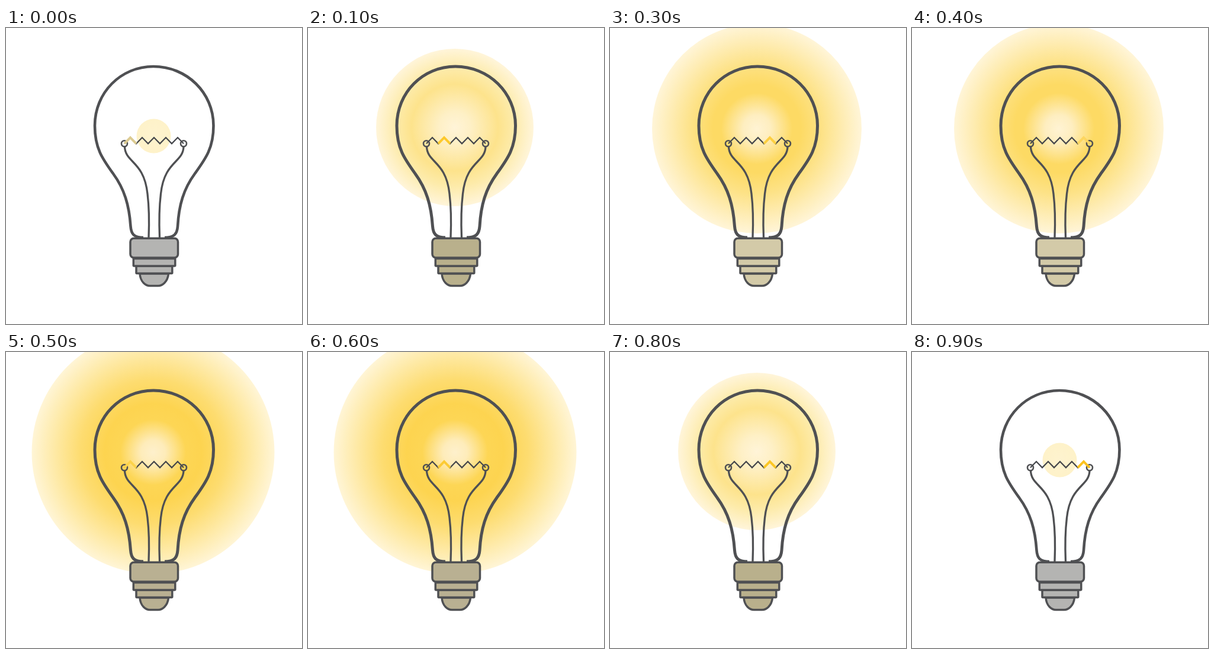
Write an HTML page with a canvas that moves like this. It is 500x500 px and loops after 1 s.

```html
<!DOCTYPE html>
<html lang="en">
<head>
<meta charset="utf-8">
<title>Light bulb</title>
<style>
html, body { margin: 0; width: 100%; height: 100%; overflow: hidden; background: #fff; }
canvas { display: block; width: 500px; height: 500px; }
</style>
</head>
<body>
<canvas id="stage" width="500" height="500"></canvas>
<script>
const ctx = document.getElementById('stage').getContext('2d');
const STEP = 100, STEPS = 10, TEETH = 5;

// Glow levels from dim to full: circle, base colour, line weight, gradient stops
const levels = [
  { x: 249.5, y: 182.5, r: 29, base: '#b4b4b2', line: 4.6,
    stops: [[0, '#fef3cf'], [1, '#fef2c9']] },
  { x: 248, y: 168, r: 133, base: '#b9b08c', line: 5,
    stops: [[0, '#fff4d8'], [0.2, '#fef0c6'], [0.55, '#fde38c'], [0.75, '#fdebaa'], [1, '#fff5da']] },
  { x: 248, y: 170, r: 177, base: '#d3caa8', line: 5,
    stops: [[0, '#fff3d3'], [0.13, '#feeec0'], [0.34, '#fdda64'], [0.42, '#fdda64'], [0.62, '#fde286'], [0.82, '#feecb2'], [1, '#fff5d8']] },
  { x: 248.5, y: 169.5, r: 205, base: '#b9b092', line: 5,
    stops: [[0, '#fef0cc'], [0.1, '#feecba'], [0.27, '#fdd655'], [0.4, '#fdd450'], [0.6, '#fddc70'], [0.82, '#feeaa8'], [1, '#fff5d6']] }
];
const order = [0, 1, 1, 2, 2, 3, 3, 2, 1, 0];
const sparks = ['#dccb92', '#fdc92c', '#fdc92c', '#fdcf42', '#fdd65f',
                '#fcd34a', '#fccb34', '#fdc92c', '#fcc724', '#fcc21f'];

const bulb = new Path2D(
  'M232 354 C216 354 211.5 348 210.5 335 C208 299 200 272 181 246 ' +
  'C163 221 150 203 150 165 C150 109 194 65 249 65 ' +
  'C305 65 350.5 109 350.5 165 C350.5 203 337 221 319 246 ' +
  'C300 272 292 299 290 335 C289 348 284 354 268 354');
const wires = new Path2D(
  'M200.5 200 C201 228 233 224 239 280 C242 305 242 330 241 354 ' +
  'M300 200 C299.5 228 267.5 224 261.5 280 C258.5 305 258.5 330 259.5 354');
const cup = new Path2D('M226 415 C227 429 236 435.5 243 435.5 H257 C264 435.5 273 429 274.5 415 Z');

function stroke(path, width, color = '#4f5053') {
  ctx.lineWidth = width;
  ctx.strokeStyle = color;
  ctx.stroke(path);
}

function circle(x, y, r) {
  const p = new Path2D();
  p.arc(x, y, r, 0, Math.PI * 2);
  return p;
}

function box(x, y, w, h, r) {
  const p = new Path2D();
  p.roundRect(x, y, w, h, r);
  return p;
}

function zigzag(first, count) {
  const p = new Path2D();
  for (let i = 0; i <= count * 2; i++) {
    p.lineTo(200 + first * 20 + i * 10, i % 2 ? 185 : 195.3);
  }
  return p;
}

function drawGlow({ x, y, r, stops }) {
  const g = ctx.createRadialGradient(x, y, 0, x, y, r);
  for (const [at, color] of stops) g.addColorStop(at, color);
  ctx.fillStyle = g;
  ctx.fill(circle(x, y, r));
}

const socket = [
  cup,
  box(220, 402, 60.8, 12.5, 1),
  box(215.3, 389.5, 70.5, 12.5, 1),
  box(210, 355.3, 80.5, 32.8, 6)
];

function draw(step) {
  const level = levels[order[step]];
  ctx.fillStyle = '#fff';
  ctx.fillRect(0, 0, 500, 500);
  drawGlow(level);
  stroke(bulb, level.line);
  stroke(wires, 3.3);
  stroke(zigzag(0, TEETH), 2.2, '#44464b');
  for (const x of [200, 300]) stroke(circle(x, 195.3, 5), 2.6);
  stroke(zigzag(step % TEETH, 1), 4, sparks[step]);
  for (const part of socket) {
    ctx.fillStyle = level.base;
    ctx.fill(part);
    stroke(part, 3.5);
  }
}

function tick() {
  draw(Math.floor(performance.now() / STEP) % STEPS);
  requestAnimationFrame(tick);
}
tick();
</script>
</body>
</html>
```
